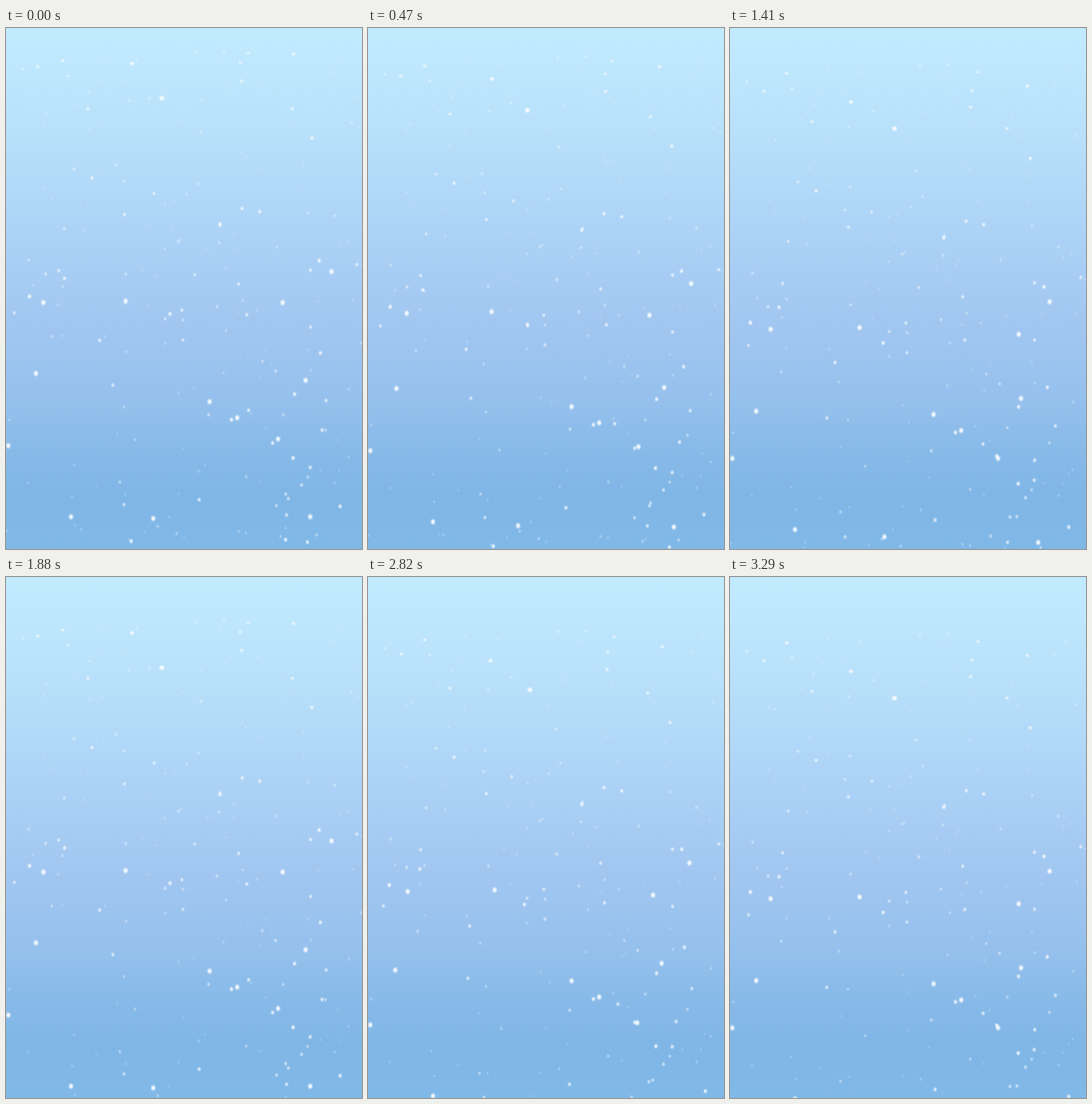
An HTML page with a canvas for the animation above (3.76 s loop, 619x905 px).

```html
<!DOCTYPE html>
<html lang="en">
<head>
<meta charset="utf-8">
<title>Snowfall</title>
<style>
  html, body { margin: 0; width: 100%; height: 100%; overflow: hidden; background: #80b8e8; }
  canvas { display: block; }
</style>
</head>
<body>
<canvas id="stage" width="619" height="905"></canvas>
<script>
const W = 619, H = 905;
const STEP = 470, STEPS = 8;
const CYCLE_FALL = 35.5;
const FALL = [0, 8.8, 17, 22.2];
const SWAY = [0, 0.4, 0.7, 1];
const ctx = document.getElementById('stage').getContext('2d');

// The most prominent flakes anchor the composition
const steadyAnchors = [[354, 649], [402, 677], [113, 849], [4, 725.5]];
const swayingAnchors = [
  [271, 122], [65, 477], [208, 474.5], [566, 423], [481, 477],
  [52, 600], [521, 612], [473, 714], [256, 852], [529, 849]
];

let seed = 4127;
function random() {
  seed = (seed * 1664525 + 1013904223) % 4294967296;
  return seed / 4294967296;
}
const between = (low, high) => low + (high - low) * random();

function makeFlake(x, y, r, alpha, sways) {
  const dx = sways ? between(-20, 22) : 0;
  const dy = sways ? between(8, 45) : 0;
  return { x, y, r, alpha, dx, dy };
}

// Small flakes are common and faint, larger ones rare and bright
function scatterFlake() {
  const size = random() ** 2.2;
  const x = between(0, W), y = between(36, H);
  return makeFlake(x, y, 3.3 + 1.7 * size, 0.16 + 0.7 * size, random() < 0.1 + 0.5 * size);
}

const anchor = sways => ([x, y]) => makeFlake(x, y, 6.1, 0.95, sways);
const flakes = [
  ...steadyAnchors.map(anchor(false)),
  ...swayingAnchors.map(anchor(true)),
  ...Array.from({ length: 195 }, scatterFlake)
];

function gradientStops(gradient, stops) {
  stops.forEach(([at, color]) => gradient.addColorStop(at, color));
  return gradient;
}

const sky = gradientStops(ctx.createLinearGradient(0, 0, 0, H), [
  [0, '#c2ebff'], [0.2, '#b8e0fa'], [0.44, '#a9cff5'], [0.58, '#a0c6f0'],
  [0.72, '#95c0ed'], [0.79, '#8abbe9'], [0.89, '#80b6e6'], [1, '#80b8e8']
]);
const glow = gradientStops(ctx.createRadialGradient(0, 0, 0, 0, 0, 1), [
  [0, '#fff'], [0.35, 'rgba(255,255,255,.88)'],
  [0.7, 'rgba(255,255,255,.3)'], [1, 'rgba(255,255,255,0)']
]);

function drawFlake({ x, y, r, alpha, dx, dy }, fall, sway) {
  // Wide near the top of the sky, tall further down
  const stretch = Math.sqrt(0.84 + 0.34 * Math.min(1, y / 480));
  ctx.save();
  ctx.translate(x + dx * sway, y + dy * sway + fall);
  ctx.scale(r / stretch, r * stretch);
  ctx.globalAlpha = alpha;
  ctx.fillStyle = glow;
  ctx.fillRect(-1, -1, 2, 2);
  ctx.restore();
}

function draw(time) {
  const step = Math.floor(time / STEP) % STEPS;
  const pose = step % FALL.length;
  const fall = Math.floor(step / FALL.length) * CYCLE_FALL + FALL[pose];
  ctx.fillStyle = sky;
  ctx.fillRect(0, 0, W, H);
  ctx.fillStyle = 'rgba(130,185,220,.2)';
  ctx.fillRect(0, 0, W, 1);
  flakes.forEach(flake => drawFlake(flake, fall, SWAY[pose]));
}

const start = performance.now();
function tick() {
  draw(performance.now() - start);
  requestAnimationFrame(tick);
}
tick();
</script>
</body>
</html>
```
